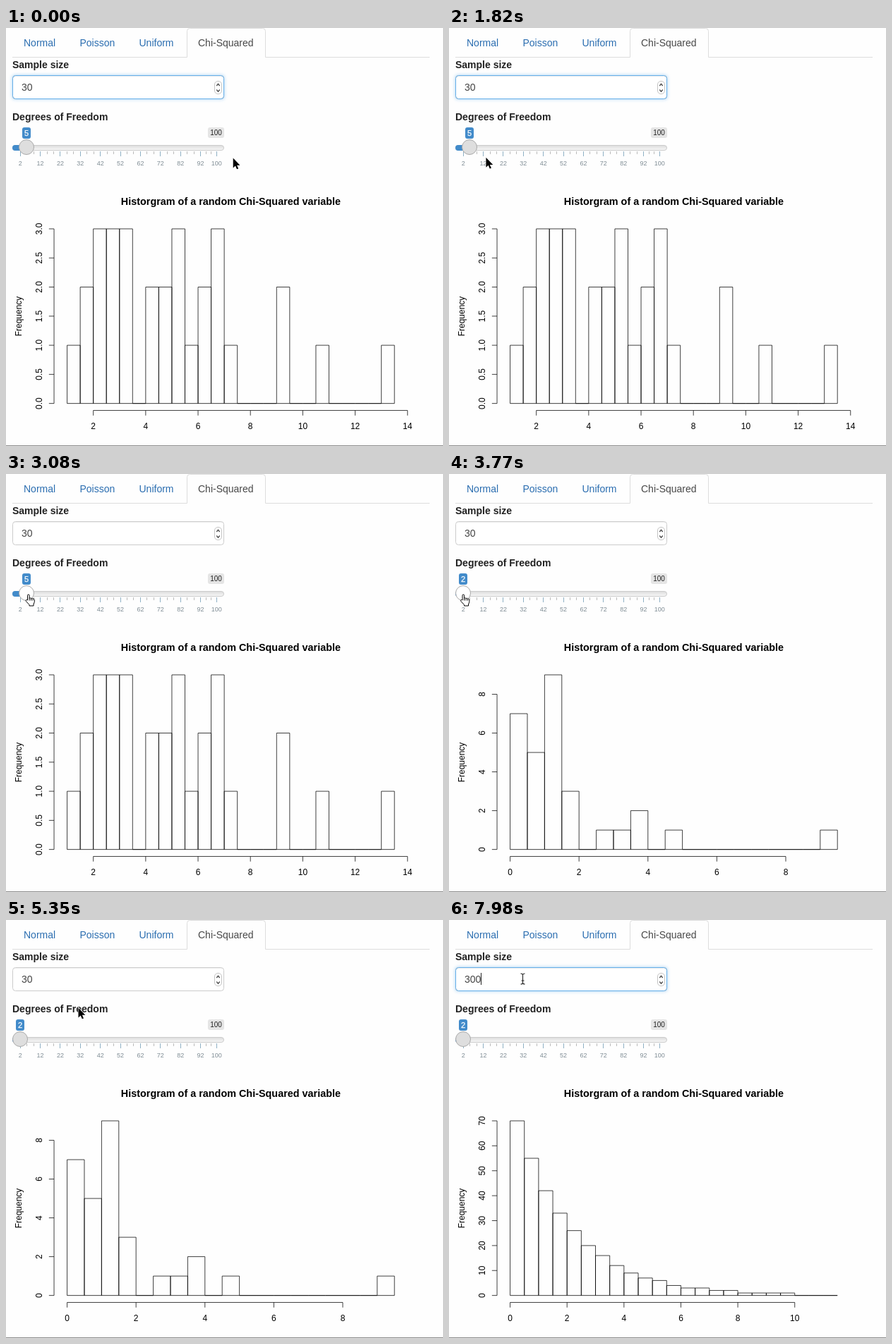
An HTML page that plays this animation: 619 by 593 pixels, repeating every 8000 ms.

```html
<!DOCTYPE html>
<html lang="en">
<head>
<meta charset="utf-8">
<title>Chi-Squared sampler</title>
<style>
  html, body { margin: 0; width: 100%; height: 100%; overflow: hidden; background: #fefefe; }
  svg { display: block; width: 619px; height: 593px; font: 14px 'Liberation Sans', Arial, sans-serif; }
  .link { fill: #2a6db0; }
  .strong { font-weight: bold; fill: #222; }
  .mid { text-anchor: middle; }
  .grid { font-size: 9px; fill: #7f8c94; }
  .plot { font-size: 12px; }
  .plot path { fill: none; stroke: #000; stroke-width: .75; }
</style>
</head>
<body>
<svg viewBox="0 0 619 593">
  <defs>
    <linearGradient id="groove" x2="0" y2="1">
      <stop stop-color="#dcdcdc"/><stop offset="1" stop-color="#f8f8f8"/>
    </linearGradient>
    <filter id="soft" x="-10%" y="-50%" width="120%" height="200%"><feGaussianBlur stdDeviation="2.4"/></filter>
  </defs>
  <rect width="619" height="593" fill="#fefefe"/>

  <path d="M9 41.5H256.5V4.5a4 4 0 0 1 4-4H363.5a4 4 0 0 1 4 4V41.5H600" fill="none" stroke="#ddd"/>
  <g class="link">
    <text x="25" y="26">Normal</text>
    <text x="104.5" y="26">Poisson</text>
    <text x="188.5" y="26">Uniform</text>
  </g>
  <text x="272" y="26" fill="#484848">Chi-Squared</text>

  <text class="strong" x="9" y="57">Sample size</text>
  <rect id="glow" x="9" y="67" width="300" height="34" rx="4" fill="#66afe9" filter="url(#soft)"/>
  <rect x="9.5" y="67.5" width="299" height="33" rx="4" fill="#fff" stroke="#ccc"/>
  <path d="M12 68.5H306" stroke="#000" stroke-opacity=".06"/>
  <rect id="ring" x="9.5" y="67.5" width="299" height="33" rx="4" fill="none" stroke="#66afe9"/>
  <text id="size" x="22" y="89" fill="#444"></text>
  <path id="caret" d="M0 75V92" stroke="#222"/>
  <rect x="295.5" y="75.5" width="10" height="18" rx="4.5" fill="#fff" stroke="#c4c4c4"/>
  <path d="M298.3 82L300.5 79.3L302.7 82M298.3 87.5L300.5 90.2L302.7 87.5" fill="none" stroke="#444" stroke-width="1.2"/>

  <text class="strong" x="9" y="131">Degrees of Freedom</text>
  <rect x="286" y="141" width="23" height="15" rx="3" fill="#e5e5e5"/>
  <text class="mid" x="297.5" y="152" font-size="10" fill="#222">100</text>
  <rect x="9.5" y="166.5" width="299" height="7" rx="3.5" fill="url(#groove)" stroke="#ccc"/>
  <rect id="bar" x="9" y="166" height="8" rx="4" fill="#428bca"/>
  <g id="grid" class="grid mid"></g>
  <g id="knob">
    <rect x="-6" y="141" width="12" height="16" rx="3" fill="#428bca"/>
    <text id="value" class="mid" y="153" font-size="11" fill="#fff" stroke="#fff" stroke-width=".25"></text>
    <circle id="handle" cy="169" r="10.5" stroke="#aaa"/>
  </g>

  <g class="plot">
    <text class="mid" x="318.4" y="251" font-size="14.4" font-weight="bold">Historgram of a random Chi-Squared variable</text>
    <text class="mid" transform="translate(22 409) rotate(-90)">Frequency</text>
    <g id="chart"></g>
  </g>
  <path d="M0 592.5H619" stroke="#8c8c8c"/>

  <path id="arrow" d="M0 0V14L3.2 11L5.3 15.8L7.5 14.9L5.4 10.2H9.8Z" fill="#000" stroke="#fff" stroke-width="1.2" paint-order="stroke"/>
  <path id="hand" d="M-1.5 8V1.3a1.3 1.3 0 0 1 2.6 0V5.5c.3-1 2.3-.9 2.5.3c.4-.9 2.3-.7 2.4.5c.5-.7 2.2-.4 2.3 1.2V10.5L7 14V16H1V14.5L-3.6 9.5c-1-1.3.4-2.8 2.1-1.5ZM1.1 5.5v3M3.6 6v2.5M6 6.5v2" fill="#fff" stroke="#000" stroke-linejoin="round"/>
  <path id="beam" d="M-3 -7.5Q0 -7.5 0 -5.5Q0 -7.5 3 -7.5M0 -6V6M-3 7.5Q0 7.5 0 5.5Q0 7.5 3 7.5M-2 2.5H2" fill="none" stroke="#222" stroke-width="1.1"/>
</svg>
<script>
const LOOP = 8000;
const DRAG = { start: 3080, end: 3350 };
const TYPED = 7560;
const PLOT = { axisX: 68.04, axisY: 542.56, left: 86.58, width: 463.63, base: 532.65, height: 247.7 };

const ui = {};
for (const node of document.querySelectorAll('svg [id]')) ui[node.id] = node;

const clamp = (v, low = 0, high = 1) => Math.max(low, Math.min(high, v));
const snap = v => Math.floor(v) + 0.5;
const sliderX = v => 20.2 + (v - 2) * 2.837;
const linear = k => k;
const easeOut = k => k * (2 - k);
const smooth = k => k * k * (3 - 2 * k);

// Bins are 0.5 wide; those past `counts` are empty except for the outliers.
const withOutliers = (counts, outliers) => i => counts[i] ?? outliers[i] ?? 0;
const charts = [
  { from: 1, bins: 25, count: withOutliers([1, 2, 3, 3, 3, 0, 2, 2, 3, 1, 2, 3, 1], { 16: 2, 19: 1, 24: 1 }),
    xTicks: [2, 14, 2], yTicks: [0, 3, 0.5], digits: 1 },
  { from: 0, bins: 19, count: withOutliers([7, 5, 9, 3, 0, 1, 1, 2, 0, 1], { 18: 1 }),
    xTicks: [0, 8, 2], yTicks: [0, 8, 2], digits: 0 },
  { from: 0, bins: 23, count: i => Math.round(70 * Math.exp(-i / 4)),
    xTicks: [0, 10, 2], yTicks: [0, 70, 10], digits: 0 }
];

function ticks([first, last, step]) {
  return Array.from({ length: Math.round((last - first) / step) + 1 }, (_, i) => first + i * step);
}

function chartMarkup({ from, bins, count, xTicks, yTicks, digits }) {
  const counts = Array.from({ length: bins }, (_, i) => count(i));
  const peak = Math.max(...counts);
  const x = v => PLOT.left + (v - from) * 2 / bins * PLOT.width;
  const y = v => PLOT.base - v / peak * PLOT.height;

  // Separate paths let shared edges darken where they overlap.
  const bars = counts.map((n, i) => {
    const left = from + i / 2;
    return `<path d="M${x(left)} ${y(0)}V${y(n)}H${x(left + 0.5)}V${y(0)}Z"/>`;
  }).join('');

  let axes = `M${x(xTicks[0])} ${PLOT.axisY}H${x(xTicks[1])}M${PLOT.axisX} ${y(yTicks[0])}V${y(yTicks[1])}`;
  let labels = '';
  for (const v of ticks(xTicks)) {
    axes += `M${x(v)} ${PLOT.axisY}v7.2`;
    labels += `<text class="mid" x="${x(v)}" y="568.6">${v}</text>`;
  }
  for (const v of ticks(yTicks)) {
    axes += `M${PLOT.axisX} ${y(v)}h-7.2`;
    labels += `<text class="mid" transform="translate(50.8 ${y(v)}) rotate(-90)">${v.toFixed(digits)}</text>`;
  }
  return `${bars}<path d="${axes}"/>${labels}`;
}

function gridMarkup() {
  const stops = [...ticks([2, 92, 10]), 100];
  return stops.map((v, i) => {
    const x = sliderX(v);
    const gap = (sliderX(stops[i + 1] ?? v) - x) / 3;
    const minor = gap ? `M${snap(x + gap)} 175v4M${snap(x + 2 * gap)} 175v4` : '';
    return `<path d="M${snap(x)} 175v7" stroke="#8fb0c4"/><path d="${minor}" stroke="#bbb"/>` +
      `<text x="${x}" y="195">${v}</text>`;
  }).join('');
}

const home = { x: 321.7, y: 184.5 };
const moves = [
  { start: 600, end: 1820, x: 52.5, y: 183.8, ease: linear, arc: 9 },
  { start: 1820, end: 2530, x: 32, y: 171, ease: easeOut },
  { ...DRAG, x: 20.5, y: 171, ease: smooth },
  { start: 4600, end: 5350, x: 102.5, y: 124.5, ease: smooth },
  { start: 5410, end: 5710, x: 106.5, y: 81.5, ease: smooth },
  { start: 6440, end: 6940, x: 104.5, y: 83.5, ease: smooth }
];

function pointerAt(t) {
  let { x, y } = home;
  for (const { start, end, x: toX, y: toY, ease, arc = 0 } of moves) {
    const k = clamp((t - start) / (end - start));
    x += (toX - x) * ease(k);
    y += (toY - y) * ease(k) + arc * Math.sin(Math.PI * k);
  }
  return { x, y };
}

// Focusing or typing restarts the blink.
function caretOn(t) {
  const since = [TYPED, 5900, 60].find(start => t >= start);
  return Math.floor((t - since) / 550) % 2 === 0;
}

function sliderValue(t) {
  const grab = pointerAt(clamp(t, DRAG.start, DRAG.end)).x - 3;
  return Math.max(2, Math.round(2 + (grab - sliderX(2)) / 2.837));
}

const show = (node, on) => node.setAttribute('visibility', on ? 'visible' : 'hidden');
ui.grid.innerHTML = gridMarkup();
let shownChart;

function render(t) {
  const focus = 1 - clamp((t - 2660) / 190) + clamp((t - 5910) / 150);
  ui.glow.setAttribute('opacity', 0.6 * focus);
  ui.ring.setAttribute('opacity', focus);

  const typed = t >= TYPED;
  ui.size.textContent = typed ? '300' : '30';
  ui.caret.setAttribute('transform', `translate(${typed ? 45.5 : 38.5} 0)`);
  show(ui.caret, focus > 0.2 && caretOn(t));

  const pointer = pointerAt(t);
  const value = sliderValue(t);
  const knobX = Math.round(sliderX(value));
  const hover = Math.hypot(pointer.x - knobX, pointer.y - 169) < 8.5;
  ui.value.textContent = value;
  ui.bar.setAttribute('width', knobX - 9);
  ui.knob.setAttribute('transform', `translate(${knobX} 0)`);
  ui.handle.setAttribute('fill', hover ? '#fff' : '#dedede');

  // The plot redraws 420 ms after an input changes.
  const chart = charts[[DRAG.end, TYPED].filter(change => t >= change + 420).length];
  if (chart !== shownChart) {
    ui.chart.innerHTML = chartMarkup(chart);
    shownChart = chart;
  }

  const kind = hover ? 'hand' : pointer.y < 101 ? 'beam' : 'arrow';
  for (const name of ['arrow', 'hand', 'beam']) show(ui[name], name === kind);
  ui[kind].setAttribute('transform', `translate(${pointer.x} ${pointer.y})`);
}

const start = performance.now();
function tick() {
  render((performance.now() - start) % LOOP);
  requestAnimationFrame(tick);
}
tick();
</script>
</body>
</html>
```
